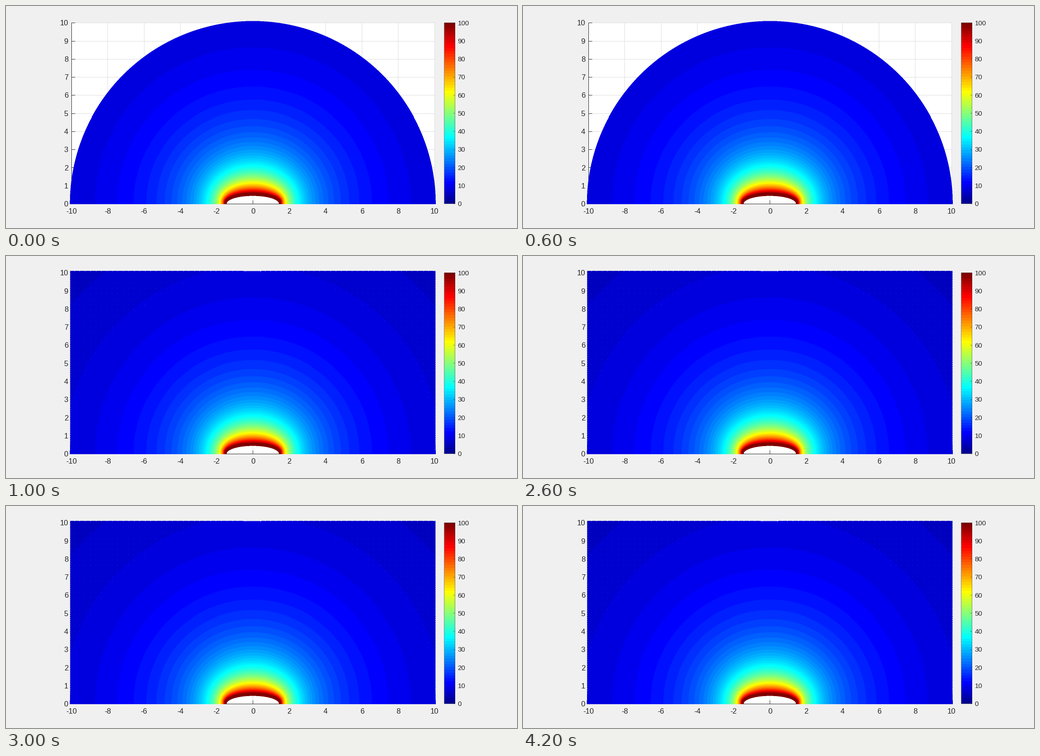
Write a matplotlib script that moves like this. It is 1133x494 px and loops after 5 s.

```python
import numpy as np
import matplotlib.pyplot as plt
from matplotlib.animation import FuncAnimation
from matplotlib.patches import Rectangle

W, H, DPI = 1133, 494, 100
LEFT, RIGHT, TOP, BOTTOM = 144.5, 950, 37.5, 440
BAR_L, BAR_R = 971.75, 995.75
UNIT = (RIGHT - LEFT) / 20
MID = (LEFT + RIGHT) / 2
CELL = UNIT / 10
INK = "#262626"
PT = 72 / DPI

plt.rcParams["font.family"] = "Liberation Sans"


def jet64():
    """64-step rainbow from dark blue to dark red."""
    k = np.arange(1, 65)
    ramp = lambda c: np.clip(1.5 - np.abs(k - c) / 16, 0, 1)
    return np.stack([ramp(48), ramp(32), ramp(16)], axis=1)


COLORS = jet64()


def potential(x, y, a=1.5, b=0.5):
    """Potential around a prolate spheroid held at 100."""
    f = np.sqrt(a * a - b * b)
    s = (np.hypot(x - f, y) + np.hypot(x + f, y)) / 2
    return 100 * np.arctanh(f / np.maximum(s, a)) / np.arctanh(f / a)


def field(full, ss=2):
    """RGBA picture of the field: half disc, or the whole rectangle."""
    px = (np.arange(W * ss) + 0.5) / ss
    py = (np.arange(H * ss) + 0.5) / ss
    px, py = np.meshgrid(px, py)
    x, y = (px - MID) / UNIT, (BOTTOM - py) / UNIT
    r = np.hypot(x, y)

    # the markers' size pushes each contour slightly outwards
    v = potential(np.maximum(np.abs(x) - 0.04, 0), np.maximum(y - 0.08, 0))
    rgb = COLORS[np.clip((v * 0.64).astype(int), 0, 63)]

    mask = r < 10.07
    hole = (x / 1.435) ** 2 + (y / 0.432) ** 2 < 1
    if full:
        # round markers leave a scalloped rim and small gaps
        box = (px > 142) & (px < 952.5) & (py > 34)
        rim = (px < 143) | (px > 951.5)
        sides = rim & ((py - BOTTOM + CELL / 2 + 0.5) % CELL < 1)
        top = (py < 35) & (((px - 151) % (3 * CELL) < 1) | (np.abs(x) < 0.47))
        mask |= box & ~sides & ~top
        dots = ((px - 186.5) % (3 * CELL) < 1) & ((py - 181.5) % (3 * CELL) < 1)
        dots &= (r > 10.1) & (px > 146) & (px < 949) & (py > 38)
        rgb = np.where(dots[..., None], rgb * 0.84 + 0.16, rgb)
    alpha = (mask & ~hole & (py < BOTTOM + 1)).astype(float)[..., None]

    shrink = lambda m: m.reshape(H, ss, W, ss, -1).mean(axis=(1, 3))
    cover = shrink(alpha)
    color = shrink(rgb * alpha) / np.maximum(cover, 1e-6)
    return np.concatenate([np.clip(color, 0, 1), cover], axis=2)


fig = plt.figure(figsize=(W / DPI, H / DPI), dpi=DPI, facecolor="#f0f0f0")
ax = fig.add_axes([0, 0, 1, 1])
ax.axis("off")


def line(x0, y0, x1, y1, color=INK, width=1.0, z=2, snap=None):
    ax.plot([x0, x1], [y0, y1], color=color, lw=width * PT, zorder=z,
            solid_capstyle="butt", snap=snap)


def label(x, y, value, size, ha):
    ax.text(x, y + 0.345 * size, str(value), fontsize=size * PT, color=INK,
            ha=ha, va="baseline", zorder=6)


ax.add_patch(Rectangle((LEFT, TOP), RIGHT - LEFT, BOTTOM - TOP, fc="white",
                       ec="none", zorder=0))

axis_y = BOTTOM - 0.5
for v in range(-10, 11, 2):
    x = MID + v * UNIT
    line(x, TOP, x, BOTTOM, "#dedede", z=1)
    line(x, axis_y, x, axis_y - 8)
    label(x + 0.4, 456, v, 16.67, "center")
for v in range(11):
    y = BOTTOM - v * UNIT
    line(LEFT, y, RIGHT, y, "#dedede", z=1)
    line(LEFT, y, LEFT + 8, y)
    label(138, y + 0.3, v, 16.67, "right")
line(LEFT, TOP, LEFT, BOTTOM)
line(LEFT, axis_y, RIGHT, axis_y)

# colour bar
ax.imshow(COLORS[::-1, None, :], extent=(BAR_L, BAR_R, BOTTOM, TOP),
          aspect="auto", interpolation="nearest", zorder=3)
ax.add_patch(Rectangle((BAR_L, TOP), BAR_R - BAR_L, BOTTOM - TOP, fc="none",
                       ec=INK, lw=0.5 * PT, snap=False, zorder=4))
for v in range(0, 101, 10):
    y = BOTTOM - v / 100 * (BOTTOM - TOP)
    line(BAR_R - 4, y, BAR_R, y, width=0.5, z=5, snap=False)
    label(1001.5, y, v, 15, "left")

STAGES = [field(False), field(True)]
heat = ax.imshow(STAGES[0], extent=(0, W, H, 0), aspect="auto",
                 interpolation="nearest", zorder=3)
ax.set_xlim(0, W)
ax.set_ylim(H, 0)


def update(i):
    heat.set_data(STAGES[min(i, 1)])
    return (heat,)


anim = FuncAnimation(fig, update, frames=5, interval=1000, repeat=True,
                     repeat_delay=0, blit=False)
plt.show()
```
